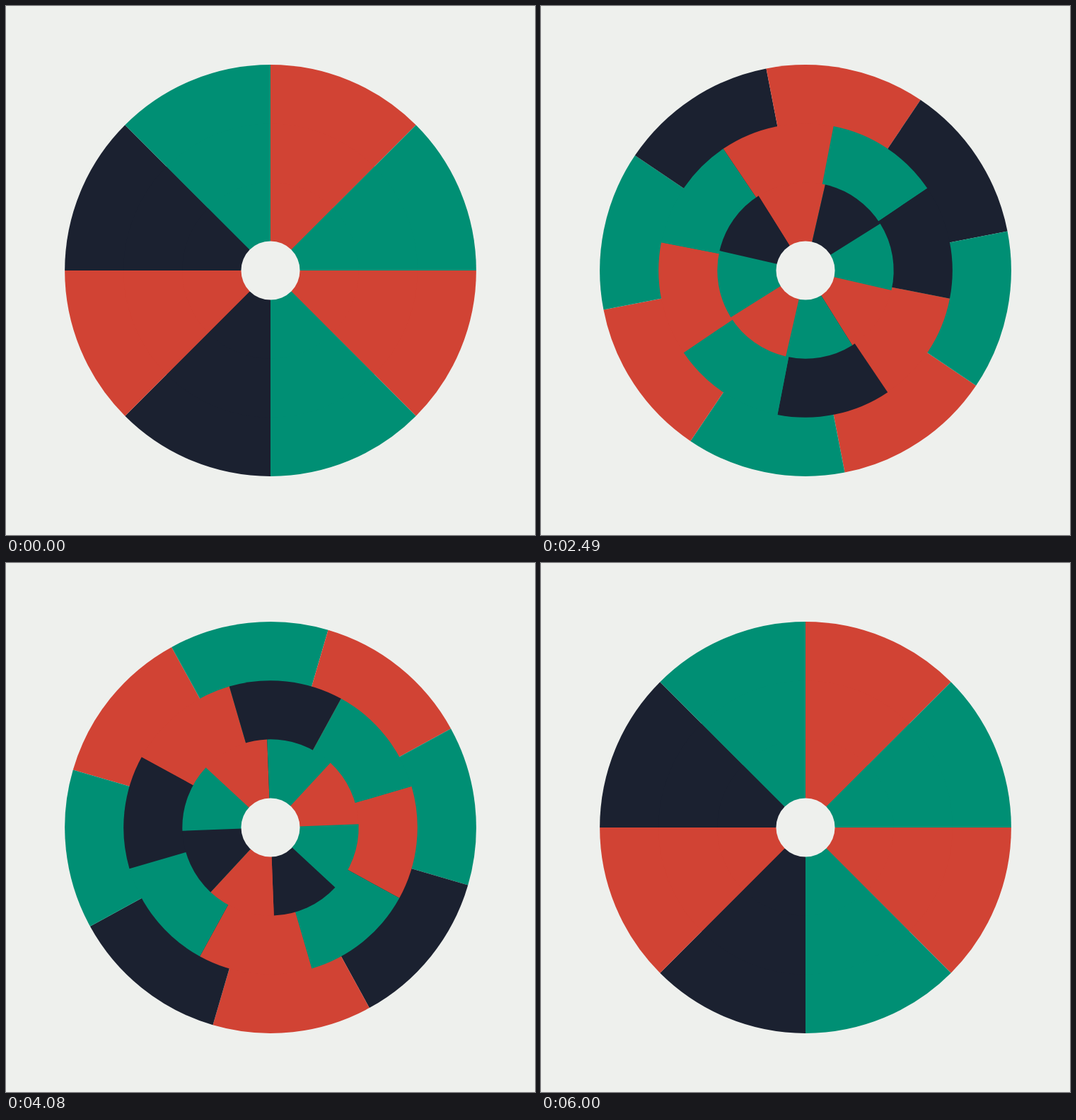
Write an HTML page that moves like this. It is 748 by 748 pixels and loops after 6030 ms.

```html
<!DOCTYPE html>
<html lang="en">
<head>
<meta charset="utf-8">
<title>Turning rings</title>
<style>
  html, body { margin: 0; width: 100%; height: 100%; overflow: hidden; background: #eef0ed; }
  svg { display: block; width: 100%; height: 100%; }
</style>
</head>
<body>
<svg id="stage" viewBox="-374 -374 748 748"></svg>
<script>
const NS = 'http://www.w3.org/2000/svg';
const RED = '#d14334', GREEN = '#008f74', DARK = '#1b2130', PAPER = '#eef0ed';
const COLORS = [RED, GREEN, RED, GREEN, DARK, RED, DARK, GREEN];
const UNIT = 748 / 18;
const STEP = 30, TURN = 6000, LOOP = TURN + STEP;

const stage = document.getElementById('stage');

const easeInOut = power => p =>
  p < 0.5 ? (2 * p) ** power / 2 : 1 - (2 - 2 * p) ** power / 2;
const quad = easeInOut(2), cubic = easeInOut(3);

function add(parent, tag, attrs = {}) {
  const el = document.createElementNS(NS, tag);
  for (const key in attrs) el.setAttribute(key, attrs[key]);
  return parent.appendChild(el);
}

// Angles run clockwise from twelve o'clock.
function point(radius, turn) {
  const a = turn * 2 * Math.PI;
  return `${(radius * Math.sin(a)).toFixed(3)} ${(-radius * Math.cos(a)).toFixed(3)}`;
}

function addWheel(radius) {
  const group = add(stage, 'g');
  const n = COLORS.length;
  COLORS.forEach((fill, i) => add(group, 'path', {
    fill,
    d: `M0 0L${point(radius, i / n)}A${radius} ${radius} 0 0 1 ${point(radius, (i + 1) / n)}Z`
  }));
  return group;
}

const wheels = [
  { size: 7, angle: p => 360 * quad(p) },
  { size: 5, angle: p => -360 * quad(p) },
  { size: 3, angle: p => 360 * cubic(p) }
].map(({ size, angle }) => ({ group: addWheel(size * UNIT), angle }));

add(stage, 'circle', { r: UNIT, fill: PAPER });

function draw(ms) {
  const t = Math.floor(((ms + 0.5) % LOOP) / STEP) * STEP;
  for (const { group, angle } of wheels) {
    group.setAttribute('transform', `rotate(${angle(t / TURN)})`);
  }
}

let start;
function tick(now) {
  start ??= now;
  draw(now - start);
  requestAnimationFrame(tick);
}
draw(0);
requestAnimationFrame(tick);
</script>
</body>
</html>
```
